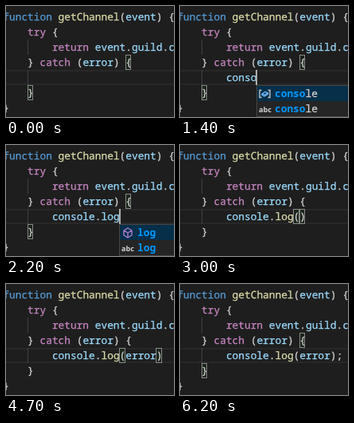
An HTML page that plays this animation: 211 by 139 pixels, repeating every 6.4 s.

```html
<!DOCTYPE html>
<html lang="en">
<head>
<meta charset="utf-8">
<title>Code editor</title>
<style>
  html, body { margin: 0; width: 100%; height: 100%; overflow: hidden; background: #1e1e1e; }
  #stage {
    position: relative; width: 211px; height: 139px; overflow: hidden;
    background: #1e1e1e; color: #d4d4d4;
    font: 12.83px/19px "Noto Sans Mono", "DejaVu Sans Mono", monospace;
    font-variant-ligatures: none; text-rendering: geometricPrecision; white-space: pre;
    -webkit-text-stroke: .25px;
  }
  #stage div, #stage svg { position: absolute; box-sizing: border-box; }
  .line { left: -3.7px; height: 19px; }
  .kw { color: #569cd6; }
  .ctl { color: #c586c0; }
  .fn { color: #dcdcaa; }
  .id { color: #9cdcfe; }
  .type { color: #4ec9b0; }
  #current { left: -9px; top: 80px; width: 240px; height: 19px; border: 2px solid #282828; }
  .guide { left: 27px; width: 1px; height: 19px; background: #404040; }
  .match { width: 7.7px; height: 19px; border: 1px solid #888; background: rgba(0, 100, 0, .1); }
  #caret { top: 80px; width: 2px; height: 19px; background: #aeafad; }
  #mark { left: 57px; top: 80px; width: 54px; height: 19px; background: rgba(38, 79, 120, .25); }
  #popup { top: 99px; width: 300px; height: 40px; border: 1px solid #454545; background: #252526; }
  .row { left: 0; width: 100%; height: 19px; }
  .row:first-child { background: #062f4a; }
  .row + .row { top: 19px; }
  .row svg { left: 2px; top: 2px; width: 16px; height: 16px; -webkit-text-stroke: 0; }
  .row div { left: 22px; top: 0; }
  .row b { color: #0097fb; -webkit-text-stroke: 0; }
  #hover {
    left: 58px; top: 53px; width: 300px; height: 28px; padding: 4px 8px;
    border: 1px solid #454545; background: #252526;
  }
</style>
</head>
<body>
<div id="stage">
  <div id="current"></div>
  <div class="guide" style="top:42px"></div>
  <div class="guide" style="top:80px"></div>
  <div id="mark"></div>
  <div class="match" id="open"></div>
  <div class="match" id="close"></div>
  <div class="line" style="top:4px"><span class="kw">function</span> <span class="fn">getChannel</span>(<span class="id">event</span>) {</div>
  <div class="line" style="top:23px">    <span class="ctl">try</span> {</div>
  <div class="line" style="top:42px">        <span class="ctl">return</span> <span class="id">event</span>.<span class="id">guild</span>.<span class="id">c</span></div>
  <div class="line" style="top:61px">    } <span class="ctl">catch</span> (<span class="id">error</span>) {</div>
  <div class="line" style="top:80px" id="typed"></div>
  <div class="line" style="top:99px">    }</div>
  <div class="line" style="top:118px">}</div>
  <div id="caret"></div>
  <div id="popup"></div>
  <div id="hover"><span class="kw">var</span> <span class="id">console</span>: <span class="type">Console</span></div>
</div>
<script>
const LOOP = 6400, PITCH = 7.698, LEFT = -4.2, INDENT = 8;
const $ = id => document.getElementById(id);
const colX = col => LEFT + col * PITCH;

const icons = {
  var: '<path d="M3.500 3.500H1v9h2.500M11.500 3.500H14v9h-2.500" fill="none" stroke="#c5c5c5" stroke-width="1.4"/>' +
       '<path d="M4 8l4-2.500 3.500 1.500v1.500L7 11 4 9.700zM4 8l3 1.300 4.500-2.300" fill="none" stroke="#75beff" stroke-width="1.2"/>',
  key: '<path d="M0 4h7m2 0h3M0 7h10m2 0h3M0 10h4m2 0h6M0 13h8m2 0h5" stroke="#c5c5c5" stroke-width="1.4"/>',
  abc: '<text x="0" y="11.500" font-family="Open Sans, sans-serif" font-size="9" font-weight="700" fill="#d4d4d4">abc</text>',
  fn: '<path d="M8 2l5 3v6l-5 3-5-3V5zM3 5l5 3 5-3M8 8v6" fill="none" stroke="#b180d7" stroke-width="1.3"/>',
  snip: '<path d="M1.500 12V2.500h12V12" fill="none" stroke="#c5c5c5" stroke-width="1.4"/>' +
        '<path d="M1 14h13" stroke="#c5c5c5" stroke-width="1.4" stroke-dasharray="2 1"/>'
};

// time, text with caret (| lit, ¦ dark), suggestions
const steps = [
  [0, '¦'],
  [500, '|'],
  [900, 'c|'],
  [1000, 'c|', 'var:console key:const'],
  [1100, 'co|', 'var:console key:const'],
  [1200, 'con|', 'var:console key:const'],
  [1300, 'cons|', 'var:console key:const'],
  [1400, 'conso|', 'var:console abc:console'],
  [1500, 'consol|', 'var:console abc:console'],
  [1600, 'console|', 'var:console abc:console'],
  [1800, 'console.|'],
  [1900, 'console.|', 'fn:assert fn:clear'],
  [2100, 'console.lo|', 'fn:log abc:log'],
  [2200, 'console.log|', 'fn:log abc:log'],
  [2500, 'console.log(|)'],
  [3000, 'console.log(¦)'],
  [3200, 'console.log(e|)', 'var:error snip:error'],
  [3400, 'console.log(er|)', 'var:error snip:error'],
  [3500, 'console.log(err|)', 'var:error snip:error'],
  [3900, 'console.log(err¦)', 'var:error snip:error'],
  [4000, 'console.log(error|)'],
  [4200, 'console.log(error)|'],
  [4700, 'console.log(error)¦'],
  [4900, 'console.log(error);|'],
  [5300, 'console.log(error);¦'],
  [5800, 'console.log(error);|'],
  [6200, 'console.log(error);¦']
];

function paint(text) {
  return text.replace(/(\w+)(\(?)/g, (_, word, paren) => {
    const kind = paren ? 'fn' : text === 'console' ? 'type' : 'id';
    return `<span class="${kind}">${word}</span>${paren}`;
  });
}

function rowHtml(item, prefix) {
  const [icon, label] = item.split(':');
  const n = prefix.length;
  return `<div class="row"><svg viewBox="0 0 16 16">${icons[icon]}</svg>` +
    `<div><b>${label.slice(0, n)}</b>${label.slice(n)}</div></div>`;
}

function show([, marked, items]) {
  const at = marked.search(/[|¦]/);
  const x = colX(INDENT + at);
  $('typed').innerHTML = ' '.repeat(INDENT) + paint(marked.replace(/[|¦]/, ''));
  $('caret').style.left = Math.floor(x) + 'px';
  $('caret').hidden = marked[at] === '¦';
  $('popup').hidden = !items;
  if (items) {
    const prefix = marked.slice(0, at).match(/\w*$/)[0];
    $('popup').style.left = Math.round(x) + 'px';
    $('popup').innerHTML = items.split(' ').map(i => rowHtml(i, prefix)).join('');
  }
}

function place(id, col, top, on) {
  const el = $(id);
  el.style.left = colX(col) + 'px';
  el.style.top = top + 'px';
  el.hidden = !on;
}

function matchBrackets(t, text) {
  if (t < 2500 || t >= 4900) {
    place('open', 20, 61, true);
    place('close', 4, 99, true);
  } else {
    const end = text.replace(/[|¦]/, '').indexOf(')');
    place('open', 19, 80, t >= 2600);
    place('close', INDENT + end, 80, t >= 2600);
  }
}

let last;
function frame() {
  const t = performance.now() % LOOP;
  const step = steps.findLast(s => s[0] <= t);
  if (step !== last) show(last = step);
  matchBrackets(t, step[1]);
  const hovering = t >= 5600 && t < 5800;
  $('hover').hidden = $('mark').hidden = !hovering;
  $('hover').style.opacity = t < 5700 ? .8 : 1;
  requestAnimationFrame(frame);
}
frame();
</script>
</body>
</html>
```
